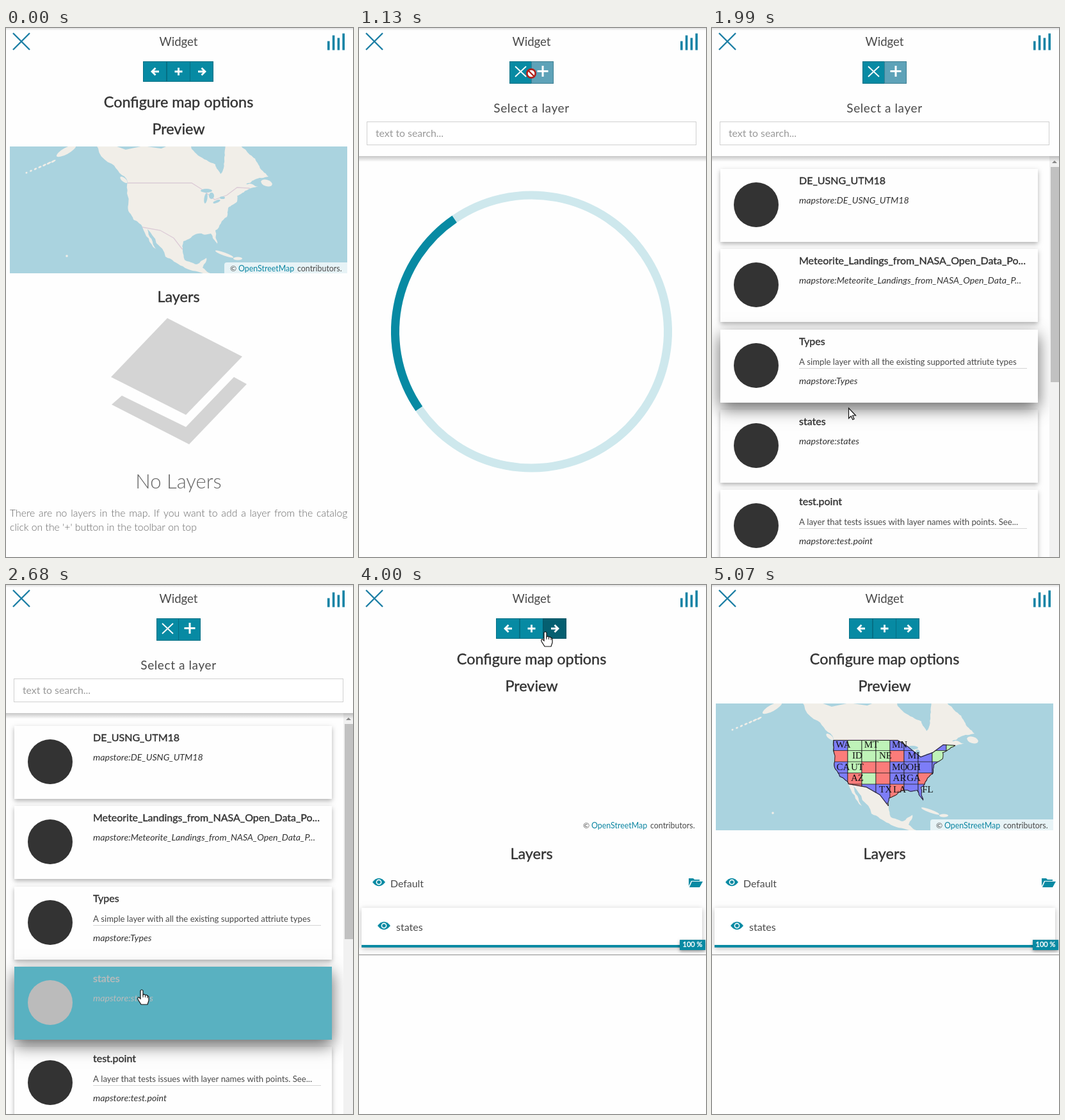
Recreate the animation shown at these times as an HTML page with a canvas. Size 542 px wide and 826 px high, loop 5630 ms.

```html
<!DOCTYPE html>
<html lang="en">
<head>
<meta charset="utf-8">
<title>Widget map options</title>
<style>
html, body { margin: 0; width: 100%; height: 100%; overflow: hidden; background: #fefefe; }
canvas { display: block; width: 542px; height: 826px; }
</style>
</head>
<body>
<canvas id="stage" width="542" height="826"></canvas>
<script>
const ctx = document.getElementById('stage').getContext('2d');
const LOOP = 5630, STEP = 76.9;
const TEAL = '#078aa3', DARK = '#055f70', INK = '#333', SOFT = '#4a4a4a', PAPER = '#fefefe';
const WATER = '#aad3df', LAND = '#f1eee8';

// Times are counted in steps of the screen refresh.
const LIST_OPEN = 15, LIST_LOADED = 20, SELECT = 32.4, LIST_CLOSED = 52, TILES = 54, STATES = 57;

// Pointer path: step, x, y. The pointer rests where a point repeats.
const POINTER = [
  [1, 423, 774], [8, 291, 101], [10, 269, 71], [15, 269, 71], [26, 213, 593], [30, 212, 632],
  [36, 212, 632], [45, 291, 73], [52, 291, 73], [58, 524, 776], [62, 524, 776], [66, 548, 832]
];

const CARDS = [
  ['DE_USNG_UTM18', 'mapstore:DE_USNG_UTM18'],
  ['Meteorite_Landings_from_NASA_Open_Data_Po...', 'mapstore:Meteorite_Landings_from_NASA_Open_Data_P...'],
  ['Types', 'mapstore:Types', 'A simple layer with all the existing supported attriute types'],
  ['states', 'mapstore:states'],
  ['test.point', 'mapstore:test.point', 'A layer that tests issues with layer names with points. See...']
];
const SELECTED = 3, PITCH = 125.3, CARD_H = 114;

const clamp = v => Math.max(0, Math.min(1, v));
const mix = (a, b, f) => a + (b - a) * f;
const shade = (a, b, f) => `rgb(${a.map((v, i) => Math.round(mix(v, b[i], f)))})`;
const inside = (p, x, y, w, h) => p.x >= x && p.x < x + w && p.y >= y && p.y < y + h;

function rect(x, y, w, h, color) {
  ctx.fillStyle = color;
  ctx.fillRect(x, y, w, h);
}

function line(path, color, width = 1) {
  ctx.strokeStyle = color;
  ctx.lineWidth = width;
  ctx.stroke(typeof path === 'string' ? new Path2D(path) : path);
}

function fill(path, color) {
  ctx.fillStyle = color;
  ctx.fill(typeof path === 'string' ? new Path2D(path) : path);
}

function blob(x, y, rx, ry, color, tilt = 0) {
  ctx.beginPath();
  ctx.ellipse(x, y, rx, ry, tilt, 0, 7);
  ctx.fillStyle = color;
  ctx.fill();
}

const disc = (x, y, r, color) => blob(x, y, r, r, color);

function text(s, x, y, size, color, { align = 'left', style = '', family = 'Lato, sans-serif', bold = 0, spacing = 0, words = 0 } = {}) {
  ctx.font = `${style} ${size}px ${family}`;
  ctx.textAlign = align;
  ctx.letterSpacing = spacing + 'px';
  ctx.wordSpacing = words + 'px';
  ctx.fillStyle = ctx.strokeStyle = color;
  ctx.fillText(s, x, y);
  if (bold) {
    ctx.lineWidth = bold;
    ctx.strokeText(s, x, y);
  }
}

const centered = (s, y, size, color, opts) => text(s, 269.5, y, size, color, { align: 'center', ...opts });
const heading = (s, y) => centered(s, y, 23.4, INK, { bold: .4 });

function scoped(draw) {
  ctx.save();
  draw();
  ctx.restore();
}

function shadowed(blur, dy, alpha, draw) {
  scoped(() => {
    ctx.shadowColor = `rgba(0,0,0,${alpha})`;
    ctx.shadowBlur = blur;
    ctx.shadowOffsetY = dy;
    draw();
  });
}

function fade(y, h, alpha) {
  const g = ctx.createLinearGradient(0, y, 0, y + h);
  g.addColorStop(0, `rgba(0,0,0,${alpha})`);
  g.addColorStop(1, 'rgba(0,0,0,0)');
  rect(0, y, 542, h, g);
}

function pointerAt(step) {
  const next = POINTER.findIndex(k => k[0] > step);
  if (next < 1) return { x: -99, y: -99 };
  const [a, b] = [POINTER[next - 1], POINTER[next]];
  const f = (step - a[0]) / (b[0] - a[0]);
  return { x: mix(a[1], b[1], f), y: mix(a[2], b[2], f) };
}

function pointerKind(step, pointer) {
  if (step < LIST_OPEN || step >= LIST_CLOSED) return inside(pointer, 214, 52, 110, 32) ? 'hand' : 'arrow';
  if (inside(pointer, 269, 52, 35, 35)) return step < SELECT ? 'blocked' : 'hand';
  const overCard = step >= LIST_LOADED && pointer.y > 220 && (pointer.y - 220) % PITCH < CARD_H;
  return overCard ? 'hand' : 'arrow';
}

function drawPointer({ x, y }, kind) {
  scoped(() => {
    ctx.translate(x, y);
    if (kind === 'blocked') {
      disc(0, 0, 8, '#b3221c');
      disc(0, 0, 5.3, '#fff');
      line('M-4.5-4.5L4.5 4.5', '#b3221c', 2.4);
      return;
    }
    const shape = kind === 'hand'
      ? 'M-2 1.5Q0-1.5 2 1.5V8Q4 6 5.5 8.5Q8 7 9 10Q11 9 11 12V17L9 23H-1L-6 15Q-7 11-4 12L-2 14Z'
      : 'M.5.5V16.5L4.2 13 6.8 18.5 9 17.5 6.6 12H11.5Z';
    fill(shape, '#fff');
    line(shape, '#111', 1.2);
    if (kind === 'hand') line('M2 8V12M5.5 9V12M9 10.5V13', '#111');
  });
}

function tooltip(label, x, alpha) {
  scoped(() => {
    ctx.globalAlpha = clamp(alpha) * .95;
    rect(x - 77.5, 19, 155, 24, '#404040');
    fill(`M${x - 5} 43h10l-5 5Z`, '#404040');
    text(label, x, 35, 13.6, '#fff', { align: 'center' });
  });
}

function header() {
  fade(0, 4, .12);
  line('M11 8L37 34M37 8L11 34', '#1d7fa5', 2.4);
  centered('Widget', 28, 18.6, SOFT);
  [14, 23, 19, 26].forEach((h, i) => rect(502 + i * 7.8, 34.5 - h, 3.6, h, '#1383a5'));
}

function button(x, y, w, h, color) {
  rect(x, y, w, h, color);
  ctx.strokeStyle = 'rgba(0,60,75,.35)';
  ctx.lineWidth = 1;
  ctx.strokeRect(x + .5, y + .5, w - 1, h - 1);
}

function mapToolbar(pointer) {
  const arrow = 'h-10M-0 0';
  ['M239 68H229M233.5 62.5L228 68L233.5 73.5', 'M269.5 62V74M263.5 68H275.5', 'M300 68H310M305.5 62.5L311 68L305.5 73.5'].forEach((icon, i) => {
    const x = Math.round(214 + i * 36.6);
    button(x, 52, 37, 32, inside(pointer, x, 52, 37, 32) ? DARK : TEAL);
    line(icon, '#fff', 2.8);
  });
}

// Park–Miller generator in 0..1.
function seeded(seed) {
  return () => (seed = seed * 16807 % 2147483647) / 2147483647;
}

// Splits every edge at a displaced midpoint, so a few points give a rugged coast.
function coast(points, rounds = 3) {
  const random = seeded(11);
  let ring = points.split(' ').map(p => p.split(',').map(Number));
  for (let n = 0; n < rounds; n++) {
    ring = ring.flatMap(([x, y], i) => {
      const [u, v] = ring[(i + 1) % ring.length];
      const push = (random() - .5) * .22;
      return [[x, y], [(x + u) / 2 + (v - y) * push, (y + v) / 2 - (u - x) * push]];
    });
  }
  return new Path2D('M' + ring.join(' ') + 'Z');
}

const MAINLAND = coast('135,170 165,212 190,240 191,276 199,299 213,311 234,345 221,314 249,357 276,372 308,383 319,383 307,374 313,359 298,369 279,362 277,333 300,321 320,321 330,337 327,316 345,295 347,281 361,271 361,262 374,254 394,248 375,244 388,237 410,232 394,213 381,198 350,170');
const HUDSON_BAY = coast('285,175 300,199 327,213 335,228 341,202 348,175');
const BORDER = new Path2D('M180,242 290,242 306,252 326,268 345,261 361,249 380,250 380,345 275,345 262,328 241,316 213,311 180,309Z');

// One word per cell: fill letter, then the label if there is one.
const FILLS = { B: '#7d7df8', G: '#bff3b8', R: '#fb7c7a' };
const STATE_GRID = [
  'BWA G GMT G BMN B B B G',
  'R GID G GNE R BMI B G G',
  'BCA GUT R R BMO BOH B B B',
  'B RAZ G R BAR BGA R B B',
  'B R B BTX RLA B BFL B B'
].map(row => row.split(' '));

function eachState(draw) {
  STATE_GRID.forEach((row, j) => row.forEach((cell, i) => draw(cell, 190 + i * 22, 241 + j * 17.5)));
}

function drawStates() {
  scoped(() => {
    ctx.clip(MAINLAND);
    ctx.clip(BORDER);
    ctx.strokeStyle = '#222';
    ctx.lineWidth = .8;
    eachState((cell, x, y) => {
      rect(x, y, 22, 30, FILLS[cell[0]]);
      ctx.strokeRect(x, y, 22, 30);
    });
    line(MAINLAND, '#222', 2);
    line(BORDER, '#222', 2);
  });
  eachState((cell, x, y) => text(cell.slice(1), x + 15, y + 12.5, 15, '#111', { align: 'center', family: '"Liberation Serif", serif' }));
}

function drawMap(withStates) {
  scoped(() => {
    ctx.beginPath();
    ctx.rect(6, 185, 527, 198);
    ctx.clip();
    rect(6, 185, 527, 198, WATER);
    fill(MAINLAND, LAND);
    scoped(() => {
      ctx.clip(MAINLAND);
      line(BORDER, '#dccbd6', 1.3);
    });
    fill(HUDSON_BAY, WATER);
    blob(407, 242, 9, 5, LAND, .3);
    blob(184, 237, 7, 3, LAND, .7);
    blob(341, 353, 15, 2.5, LAND, .35);
    blob(362, 360, 7, 2.5, LAND);
    blob(94, 192, 17, 5, LAND, -.5);
    for (let i = 0; i < 7; i++) blob(74 - i * 7, 208 + i * 3, 4 - i * .4, 1.3, LAND, -.5);
    disc(95, 356, 1.8, LAND);
    blob(313, 254, 9, 3, WATER);
    blob(312, 266, 2.5, 8, WATER, .15);
    blob(321, 262, 4, 5, WATER);
    blob(329, 271, 6, 2, WATER, -.4);
    blob(338, 265, 4, 2, WATER);
    if (withStates) drawStates();
    ctx.beginPath();
    ctx.roundRect(341, 366, 192, 17, [4, 0, 0, 0]);
    ctx.fillStyle = 'rgba(255,255,255,.72)';
    ctx.fill();
  });
}

function eye(x, y) {
  fill(`M${x - 10} ${y}q10-12.5 20 0q-10 12.5-20 0Z`, TEAL);
  disc(x, y, 4.4, '#fff');
  disc(x, y, 2.8, TEAL);
}

function emptyLayers() {
  fill('M252 453L369 513 281 604 164 545Z', '#d4d4d4');
  fill('M181 574L281 623 356 545 376 556 286 650 165 588Z', '#d4d4d4');
  centered('No Layers', 719, 31, '#666', { style: '300' });
  text('There are no layers in the map. If you want to add a layer from the catalog', 6, 763, 15.8, '#666', { style: '300', words: 1.5 });
  text("click on the '+' button in the toolbar on top", 6, 785, 15.8, '#666', { style: '300' });
}

function layerTree() {
  eye(31, 464);
  text('Default', 49, 472, 15.9, SOFT);
  fill('M515 470V458H522L524 460H532V462H519Z', TEAL);
  fill('M516 472L520 463H537L532 472Z', TEAL);
  shadowed(8, 2, .25, () => rect(4, 504, 532, 62, '#fff'));
  eye(39, 532);
  text('states', 58, 540, 16, SOFT);
  rect(4, 562, 497, 4, TEAL);
  shadowed(5, 2, .4, () => rect(501, 554, 40, 16, TEAL));
  text('100 %', 521, 565, 11, '#fff', { align: 'center', bold: .4 });
  rect(0, 577, 542, 1, '#8a8a8a');
}

function mapOptions(step, pointer) {
  const filled = step >= LIST_CLOSED;
  mapToolbar(pointer);
  heading('Configure map options', 124);
  heading('Preview', 166);
  heading('Layers', 428);
  if (!filled || step >= TILES) drawMap(step >= STATES);
  text('©', 350, 380, 12.2, SOFT);
  text('OpenStreetMap', 363, 380, 12.4, '#0d86a2');
  text('contributors.', 455, 380, 12.4, SOFT);
  if (filled) {
    layerTree();
  } else {
    emptyLayers();
    tooltip('Add a layer to the map', 270.5, (step - 10) / 2);
  }
}

function card(index, lifted, chosen) {
  const [title, name, about] = CARDS[index];
  const y = Math.round(220 + index * PITCH);
  const ink = shade([51, 51, 51], [255, 255, 255], chosen);
  const box = () => rect(13, y, 496, CARD_H, shade([254, 254, 254], [7, 138, 163], chosen));
  lifted ? shadowed(24, 9, .6, box) : shadowed(7, 3, .3, box);
  disc(69, y + 56, 35, ink);
  text(title, 136, y + 24, 16, ink, { bold: .4 });
  if (about) {
    text(about, 136, y + 55, 13.2, SOFT);
    rect(136, y + 60, 356, 1, '#d5d5d5');
  }
  text(name, 136, y + (about ? 85 : 54), 14.2, ink, { style: 'italic' });
}

function cards(pointer, chosen) {
  const hovered = Math.floor((pointer.y - 220) / PITCH);
  const isLifted = i => i === hovered || (i === SELECTED && chosen > 0);
  // Lifted cards come last so that their shadow falls on the neighbours.
  for (const lifted of [false, true]) {
    CARDS.forEach((_, i) => {
      if (isLifted(i) === lifted) card(i, lifted, i === SELECTED ? chosen : 0);
    });
  }
  rect(527, 200, 15, 626, '#f1f1f1');
  rect(529, 217, 13, 336, '#c1c1c1');
  fill('M531 211h8l-4-4Z', '#888');
}

function spinner(step) {
  const start = (step - LIST_OPEN) * STEP / 1100 * 2 * Math.PI + 2.541;
  const arc = (sweep, color) => {
    ctx.beginPath();
    ctx.arc(269.5, 474, 213, start, start + sweep);
    ctx.strokeStyle = color;
    ctx.lineWidth = 13;
    ctx.stroke();
  };
  arc(2 * Math.PI, '#cee8ed');
  arc(Math.PI / 2, TEAL);
}

function layerList(step, pointer) {
  const chosen = clamp((step - SELECT) / 3.9);
  step < LIST_LOADED ? spinner(step) : cards(pointer, chosen);
  rect(0, 45, 542, 155, PAPER);
  fade(200, 9, .22);
  const live = inside(pointer, 269, 52, 35, 35) ? DARK : TEAL;
  button(235, 52, 35, 35, TEAL);
  button(269, 52, 35, 35, chosen ? live : '#5ea2b8');
  line('M244 60L261 76M261 60L244 76', '#fff', 1.8);
  line('M287 59V76M278.5 67.5H295.5', '#fff', 3);
  centered('Select a layer', 132, 19, SOFT, { spacing: .6 });
  rect(12, 146, 515, 37, '#d0d0d0');
  rect(13, 147, 513, 35, '#fff');
  text('text to search...', 26, 170, 15.8, '#999');
  tooltip('Use the selected layer', 287.5, (step - 44) / 2);
}

function draw(ms) {
  const step = Math.floor((ms + 28) / STEP);
  const pointer = pointerAt(step);
  const listOpen = step >= LIST_OPEN && step < LIST_CLOSED;
  rect(0, 0, 542, 826, PAPER);
  header();
  listOpen ? layerList(step, pointer) : mapOptions(step, pointer);
  drawPointer(pointer, pointerKind(step, pointer));
}

const begin = performance.now();
function tick() {
  draw((performance.now() - begin) % LOOP);
  requestAnimationFrame(tick);
}
tick();
</script>
</body>
</html>
```
